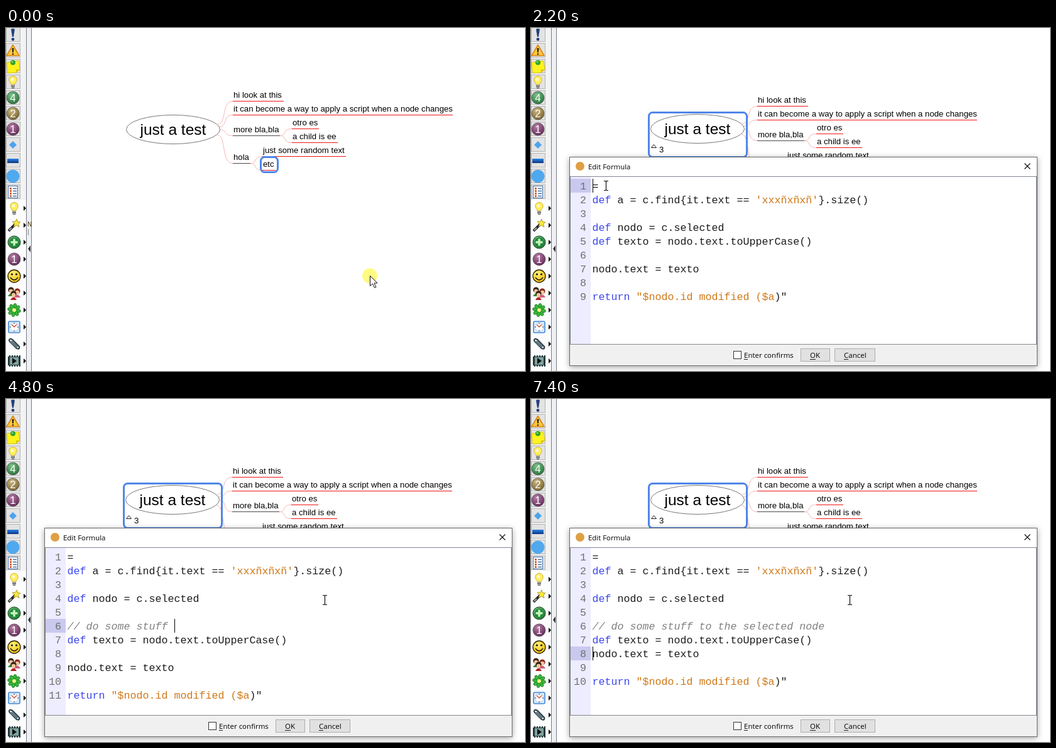
An HTML page that plays this animation: 826x546 px, repeating every 8000 ms.

```html
<!DOCTYPE html>
<html lang="en">
<head>
<meta charset="utf-8">
<title>Mind map formula editor</title>
<style>
html, body { margin: 0; width: 826px; height: 546px; overflow: hidden; background: #fff; }
svg { display: block; }
text { white-space: pre; }
.map { font: 13.2px "Liberation Sans", Arial, sans-serif; }
.code { font: 16.667px "Liberation Mono", monospace; fill: #1c1c1c; }
.ui { font: 11.5px "Open Sans", sans-serif; }
.num { font: 17px "Liberation Sans", Arial, sans-serif; fill: #fff; text-anchor: middle; }
</style>
</head>
<body>
<svg id="stage" width="826" height="546" viewBox="0 0 826 546">
  <defs>
    <radialGradient id="green" cx=".4" cy=".3" r=".8"><stop offset="0" stop-color="#7cc487"/><stop offset="1" stop-color="#1c6a30"/></radialGradient>
    <radialGradient id="gold" cx=".4" cy=".3" r=".8"><stop offset="0" stop-color="#cdb981"/><stop offset="1" stop-color="#6f5a25"/></radialGradient>
    <radialGradient id="plum" cx=".4" cy=".3" r=".8"><stop offset="0" stop-color="#b87fa8"/><stop offset="1" stop-color="#5a1f50"/></radialGradient>
    <radialGradient id="sun" cx=".4" cy=".3" r=".8"><stop offset="0" stop-color="#fff27a"/><stop offset="1" stop-color="#f2b600"/></radialGradient>
    <linearGradient id="bar" x2="0" y2="1"><stop offset="0" stop-color="#2f86e6"/><stop offset="1" stop-color="#06337f"/></linearGradient>
    <filter id="shade" x="-5%" y="-8%" width="110%" height="116%"><feDropShadow dx="0" dy="2" stdDeviation="5" flood-opacity=".36"/></filter>
  </defs>
  <rect width="826" height="546" fill="#fff"/>
  <g id="map"></g>
  <g id="side"></g>
  <g id="dialog" filter="url(#shade)">
    <rect x="61.5" y="205.5" width="744" height="332" fill="#fff" stroke="#6b6b6b"/>
  </g>
  <g id="panel">
    <circle cx="78" cy="220" r="7" fill="#dfa043"/>
    <text class="ui" style="font-size:11.4px" x="91" y="225">Edit Formula</text>
    <path d="M785.5 215.5l9 9m0-9l-9 9" stroke="#111" stroke-width="1.2"/>
    <rect x="62" y="503" width="743" height="34" fill="#f0f0f0"/>
    <path d="M62 236.5H805M62 503.5H805M62.5 236V504M804.5 236V504" stroke="#828790" fill="none"/>
    <rect x="63" y="237" width="32" height="266" fill="#eeecff"/>
    <rect x="322.500" y="514.500" width="12" height="12" fill="#fff" stroke="#333"/>
    <g fill="#e1e1e1" stroke="#adadad"><rect x="429.500" y="510.500" width="46" height="20"/><rect x="483.500" y="510.500" width="64" height="20"/></g>
    <g class="ui"><text x="339" y="525">Enter confirms</text><text x="444" y="525">OK</text><text x="498" y="525">Cancel</text></g>
    <path d="M339 527.500h6M444 527.500h9M498 527.500h7" stroke="#222"/>
  </g>
  <g id="code" class="code"></g>
  <g id="mouse"></g>
</svg>
<script>
const LOOP = 8000, BLUE = '#4f86ea';
const el = id => document.getElementById(id);
const esc = s => s.replace(/&/g, '&amp;').replace(/</g, '&lt;');
const at = (x, y, s) => `<g transform="translate(${x} ${y})">${s}</g>`;
const path = (d, fill, more = '') => `<path d="${d}" fill="${fill}" ${more}/>`;
const line = (d, color, w = 1) => path(d, 'none', `stroke="${color}" stroke-width="${w}"`);
const disc = (x, y, r, fill, more = '') => `<circle cx="${x}" cy="${y}" r="${r}" fill="${fill}" ${more}/>`;
const box = (x, y, w, h, fill, more = '') => `<rect x="${x}" y="${y}" width="${w}" height="${h}" fill="${fill}" ${more}/>`;
const text = (x, y, s, more = '') => `<text x="${x}" y="${y}" ${more}>${esc(s)}</text>`;

// ---- icon bar; every icon is centred on 0,0
const ball = (grad, n) => disc(0, 0, 10, `url(#${grad})`, 'stroke="#555" stroke-width=".8"') + text(0, 6, n, 'class="num"');
const bulb = path('M-3 4C-3 1-7 0-6-5C-5-11 5-11 6-5C7 0 3 1 3 4Z', '#ffee5c', 'stroke="#c9a227" stroke-width=".8"') +
  disc(-1, -4, 2.5, '#fffbd0') + box(-3, 4, 6, 5, '#aaa') + line('M-3 6.500H3M-2 9.500H2', '#555');
const mark = path('M-3-9Q0-11 3-9L1 3H-1Z', '#24407c') + disc(0, 7, 2.4, '#24407c');
const warn = path('M0-9L10 8H-10Z', '#ffc83a', 'stroke="#d98211" stroke-width="1.5" stroke-linejoin="round"') +
  path('M-1.500-4h3l-.7 7h-1.600Z', '#222') + disc(0, 5.500, 1.3, '#222');
const note = path('M-10-6L9-9L11 5L5 10L-8 11Z', '#fff21f', 'stroke="#cdb800" stroke-width=".7"') +
  path('M5 10L5 5L11 5Z', '#d8c400') + disc(0, -6, 4, '#31a52c') + disc(-1, -7, 1.3, '#8be081');
const list = box(-7.5, -9.5, 15, 19, '#fff', 'stroke="#3f6fa8"') +
  [-6, -2, 2, 6].map(y => box(-5, y - 1, 3, 3, '#d9603b') + line(`M0 ${y + .5}H6`, '#3f6fa8', 1.5)).join('');
const wand = line('M-9 9L2-2', '#222', 4) + line('M-8 8L-4 4', '#aaa', 2) +
  path('M4-10L5.500-5.500L10-5L6.500-2L8 3L3.500 0L-1 2.500L.5-2.500L-3-6L2-6Z', '#ffe83b', 'stroke="#8c7a12" stroke-width=".7"');
const plus = disc(0, 0, 10, 'url(#green)', 'stroke="#124a1c"') + disc(0, 0, 7.500, '#1f8a36') + line('M-5.500 0H5.500M0-5.500V5.500', '#c9f5c0', 3.4);
const smile = disc(0, 0, 10, 'url(#sun)', 'stroke="#2b2200" stroke-width="1.3"') + disc(-3.5, -3, 1.6, '#111') +
  disc(3.5, -3, 1.6, '#111') + line('M-6 2Q0 10 6 2', '#111', 1.4);
const person = (x, y, hair, coat) => path(`M${x - 5} ${y + 9}Q${x} ${y} ${x + 5} ${y + 9}Z`, coat) +
  disc(x, y - 1, 4.6, hair) + disc(x, y + 1, 3.2, '#f3c49b');
const people = person(-5, -4, '#3b2114', '#3c8b3a') + person(5, -2, '#8a2a1c', '#d35a82') + person(-1, 2, '#33231b', '#b02020');
const flower = [...Array(8)].map((_, i) =>
  `<ellipse cy="-6" rx="2.700" ry="4.600" fill="#38b838" stroke="#14661a" stroke-width=".7" transform="rotate(${i * 45 + 10})"/>`).join('') + disc(0, 0, 3, '#f5f08a');
const clock = box(-9, -9, 18, 18, '#dcecfb', 'rx="2" stroke="#3f86d6" stroke-width="1.6"') + disc(0, 0, 7, '#fff', 'stroke="#a9c4e2"') +
  line('M-4-4L0 0L4-4', '#c03a2b', 1.2) + line('M0-7V-5M0 5V7M-7 0H-5M5 0H7', '#333');
const clip = line('M-8-5L4 7Q9 9 8 4L-3-7Q-8-10-8-5', '#2f444c', 2.400) + line('M-5-4L5 5', '#60767e', 4);
const film = box(-10, -9, 20, 18, '#24383c') + box(-7, -6, 14, 12, '#7fa19d') + path('M-3-5L4 0L-3 5Z', '#111') +
  path('M-10-8H10M-10 8H10', 'none', 'stroke="#d7e2e0" stroke-width="2" stroke-dasharray="2 2"');

const buttons = [mark, warn, note, bulb, ball('green', '4'), ball('gold', '2'), ball('plum', '1'),
  path('M0-6L6 0L0 6L-6 0Z', '#4da3ee'), box(-9, -3, 18, 7, 'url(#bar)'), disc(0, 0, 10.500, '#50a8ee'), list];
const menus = [bulb, wand, plus, ball('plum', '1'), smile, people, flower, clock, clip, film];

el('side').innerHTML = box(0, 0, 33, 274, '#f3f3f3') + box(0, 274, 33, 272, '#fdfdfd') + box(33, 0, 8, 546, '#eef0f4') +
  line('M32.500 0V546M40.500 0V546', '#777c84') + path('M39 346V357L35 351.500Z', '#333') +
  buttons.map((s, i) => at(11, 11 + i * 25, box(-10.5, -11.5, 22, 22, '#e3e3e3', 'stroke="#b4b4b4"') + s)).join('') +
  menus.map((s, i) => at(13, 287 + i * 27, s + path('M15-4L19 0L15 4Z', '#000'))).join('') +
  '<g id="tab">' + text(34, 316, 'N', 'font-family="Liberation Sans, sans-serif" font-size="10" fill="#4a3500"') + line('M35.500 320V330', '#888') + '</g>';

// ---- mind map: label, text x, rule y, rule end, main rule colour
const nodes = [
  ['hi look at this', 361, 115, 441, 1],
  ['it can become a way to apply a script when a node changes', 361, 137, 710, 1],
  ['more bla,bla', 361, 170, 435, 0],
  ['otro es', 455, 159, 497, 1],
  ['a child is ee', 455, 181, 527, 1],
  ['hola', 361, 214, 388, 0],
  ['just some random text', 408, 203, 540, 1],
  ['etc', 408, 225, 428, 1]
];
const roots = [[0, 336, 152], [1, 339, 156], [2, 340, 161], [5, 335, 169]];
const forks = [[2, 3], [2, 4], [5, 6], [5, 7]];
const redraws = [100, 200, 300, 600, 700, 800, 1000];
const swapped = [0, 1, 0, 1, 1, 0, 1, 0];
const frame = (x, y, w, h) => box(x, y, w, h, 'none', `rx="6" stroke="${BLUE}" stroke-width="3"`);

function drawMap(t) {
  const n = redraws.filter(r => t >= r).length, big = n > 3, dy = big ? 9 : 0;
  const edge = (x, y, i) => {
    const ex = nodes[i][1] - 1, ey = nodes[i][2] + dy + .5, h = (ex - x) * .6;
    return line(`M${x} ${y}C${x + h} ${y} ${ex - h - 4} ${ey} ${ex} ${ey}`, '#f8b4b4');
  };
  let s = roots.map(([i, x, y]) => edge(x, y, i)).join('') +
    forks.map(([a, b]) => edge(nodes[a][3], nodes[a][2] + dy + .5, b)).join('');
  s += '<ellipse cx="265" cy="160.500" rx="74.500" ry="23" fill="#fff" stroke="#777"/>' +
    text(212.5, 169, 'just a test', 'font-size="24.500"');
  for (const [label, x, y, end, red] of nodes)
    s += text(x, y + dy - 5, label) + line(`M${x - 1} ${y + dy + .5}H${end}`, red ^ swapped[n] ? '#f01414' : '#4a4a4a');
  s += n ? frame(187.5, 134.5, 156, big ? 71 : 53) : frame(404.5, 204.5, 27, 24);
  if (big) s += path('M191.500 190.500H199.500L195.500 185.500Z', 'none', 'stroke="#222"') + text(204, 198, '3');
  el('map').innerHTML = `<g class="map" transform="translate(${n ? '0 0' : '1 1'})">${s}</g>`;
}

// ---- editor
const script = ['=', "def a = c.find{it.text == 'xxxñxñxñ'}.size()", '', 'def nodo = c.selected',
  'def texto = nodo.text.toUpperCase()', '', 'nodo.text = texto', '', 'return "$nodo.id modified ($a)"'];
const remark = '// do some stuff to the selected node';
// bursts of typing: start, steps, first and last length
const bursts = [[3300, 3, 2, 5], [3700, 9, 7, 15], [4600, 1, 16, 16], [4800, 2, 17, 18],
  [5100, 9, 19, 27], [6000, 2, 28, 29], [6300, 3, 31, 33], [6700, 4, 34, 37]];

function typed(t) {
  let n = 0;
  for (const [start, steps, a, b] of bursts) {
    const k = Math.min(steps - 1, Math.floor((t - start) / 100));
    if (k >= 0) n = Math.round(a + (b - a) * (steps > 1 ? k / (steps - 1) : 0));
  }
  return n;
}

function editor(t) {
  if (t < 1900) return { rows: [''], row: 0, col: 0 };
  const rows = script.slice();
  if (t < 2900) return { rows, row: 0, col: 0 };
  if (t < 3000) return { rows, row: 3, col: 21 };
  rows.splice(4, 0, '');
  if (t < 3100) return { rows, row: 4, col: 0 };
  const n = typed(t);
  rows.splice(5, 0, remark.slice(0, n));
  if (t < 7100) return { rows, row: 5, col: n };
  if (t < 7200) return { rows, row: 6, col: 35 };
  if (t >= 7400) rows.splice(7, 1);
  return { rows, row: 7, col: 0 };
}

const paint = s => esc(s).replace(/(\/\/.*)|('[^']*'|"[^)]+)|\b(def|return)\b/g, (m, note, str) =>
  `<tspan ${note ? 'fill="#808080" font-style="italic"' : `fill="${str ? '#d07818' : '#3c46ec'}"`}>${m}</tspan>`);

function drawCode(t) {
  const { rows, row, col } = editor(t), x = 98.5 + col * 10;
  el('code').innerHTML = box(63, 240 + row * 22, 32, 22, '#c9c8ee') +
    rows.map((s, i) => text(88, 257 + i * 22, String(i + 1), 'text-anchor="end" fill="#707070"') +
      `<text x="97.500" y="${257 + i * 22}">${paint(s)}</text>`).join('') +
    line(`M${x} ${240 + row * 22}v22`, '#000');
}

// ---- pointer
const arrow = path('M0 0V16L4 12.500L7 19L9.500 18L6.500 11.500H11.500Z', '#fff', 'stroke="#111"');
const beam = line('M-3.500-7.500H-1L0-6.500L1-7.500H3.500M0-6.500V6.500M-3.500 7.500H-1L0 6.500L1 7.500H3.500', '#111', 1.2);
const ring = disc(0, 0, 9, 'none', 'stroke="#3c9be0" stroke-width="4"');
const stops = [[1900, 352, 217], [2000, 270, 229], [2100, 172, 243], [2200, 119.5, 251],
  [2700, 240, 273], [2800, 420, 304], [2900, 507.5, 320]];

function drawMouse(t) {
  let s = '';
  if (t < 1200) {
    const d = t < 100 ? 1 : 0;
    if (t < 200) s = disc(579, 394.5, 12, '#fffb82', `opacity="${t < 100 ? 1 : .5}"`);
    s += at(578.5 + d, 393.5 + d, arrow);
  } else if (t < 1400) s = at(352, 217, ring);
  else if (t >= 1900) {
    const [, x, y] = stops.filter(p => t >= p[0]).pop();
    s = at(x, y, y < 237 ? arrow : beam);
  }
  el('mouse').innerHTML = s;
}

// ---- clock: the screen refreshes ten times a second
let last = -1;
function draw(now) {
  const t = Math.floor((now % LOOP) / 100) * 100;
  if (t !== last) {
    last = t;
    const open = t >= 1200;
    for (const id of ['dialog', 'panel', 'code']) el(id).style.display = open ? '' : 'none';
    el('tab').style.display = open ? 'none' : '';
    drawMap(t);
    drawCode(t);
    drawMouse(t);
  }
}
const start = performance.now();
function tick() {
  draw(performance.now() - start);
  requestAnimationFrame(tick);
}
tick();
</script>
</body>
</html>
```
